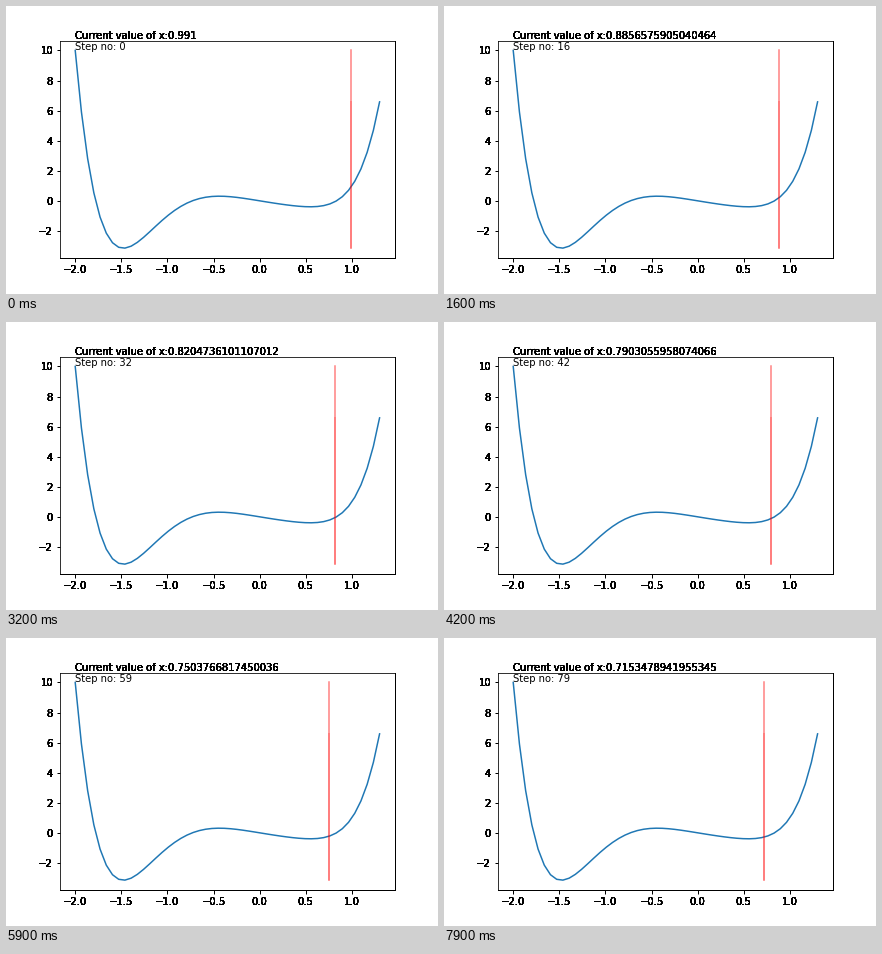
Write a matplotlib script that moves like this. It is 432x288 px and loops after 8000 ms.

```python
import numpy as np
import matplotlib.pyplot as plt
from matplotlib.animation import FuncAnimation

STEPS = 80
RATE = 0.001


def f(x):
    return x**6 + x**5 - x**4 + x**3 - x


def slope(x):
    return 6 * x**5 + 5 * x**4 - 4 * x**3 + 3 * x**2 - 1


def descend(x, steps):
    path = []
    for _ in range(steps):
        x = x - RATE * slope(x)
        path.append(x)
    return path


def harden(artist, times=12):
    """Overdraw an artist so its soft edges turn solid."""
    draw = artist.draw

    def repeat(renderer):
        for _ in range(times):
            draw(renderer)

    artist.draw = repeat


plt.rcParams.update({"font.family": "DejaVu Sans", "font.size": 10})
fig, ax = plt.subplots(figsize=(6, 4), dpi=72, facecolor="white")
fig.subplots_adjust(left=0.125, right=0.9, bottom=0.125, top=0.88)

xs = np.linspace(-2, 1.3, 50)
ys = f(xs)
path = descend(1.0, STEPS)

ax.plot(xs, ys, color="#1f77b4", lw=1.5)
# The marker retraces every y value, so its lower part is denser.
marker, = ax.plot(np.full_like(ys, path[0]), ys, color="red", lw=1.5, alpha=0.5)
value = ax.text(-2, 10.75, "")
step = ax.text(-2, 10, "")

ax.tick_params(width=1)
for side in ("bottom", "right"):
    ax.spines[side].set_linewidth(1)

fig.canvas.draw()
for label in ax.get_xticklabels() + ax.get_yticklabels() + [value]:
    harden(label)


def update(i):
    x = path[i]
    marker.set_xdata(np.full_like(ys, x))
    value.set_text(f"Current value of x:{x}")
    step.set_text(f"Step no: {i}")
    return marker, value, step


anim = FuncAnimation(fig, update, frames=STEPS, interval=100,
                     repeat=True, repeat_delay=0, blit=False)
plt.show()
```
